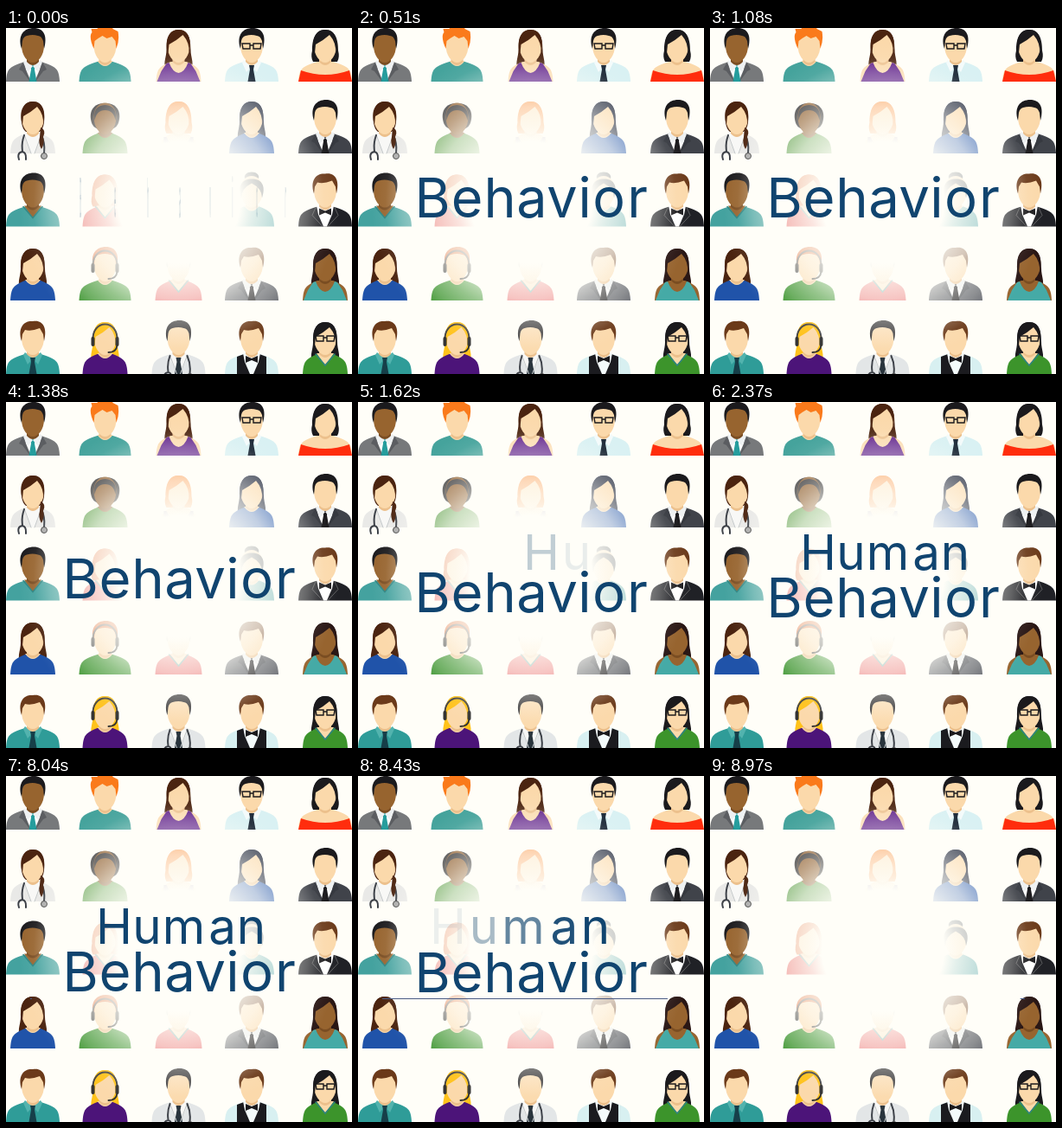
Write an HTML page that moves like this. It is 400 px wide and 400 px high and loops after 9000 ms.

```html
<!DOCTYPE html>
<html lang="en">
<head>
<meta charset="utf-8">
<title>Human Behavior</title>
<style>
html, body { margin: 0; width: 100%; height: 100%; overflow: hidden; background: #fffef8; }
svg { display: block; width: 100%; height: 100%; }
text { font-family: Inter, Roboto, sans-serif; font-weight: 400; fill: #10446f; text-anchor: middle; }
</style>
</head>
<body>
<svg viewBox="0 0 400 400">
  <defs>
    <radialGradient id="fade" gradientUnits="userSpaceOnUse" cx="200" cy="202" r="185">
      <stop offset=".38" stop-color="#fffef8"/>
      <stop offset=".46" stop-color="#fffef8" stop-opacity=".88"/>
      <stop offset=".60" stop-color="#fffef8" stop-opacity=".72"/>
      <stop offset=".70" stop-color="#fffef8" stop-opacity=".5"/>
      <stop offset=".81" stop-color="#fffef8" stop-opacity=".3"/>
      <stop offset=".91" stop-color="#fffef8" stop-opacity=".06"/>
      <stop offset="1" stop-color="#fffef8" stop-opacity="0"/>
    </radialGradient>
    <clipPath id="aboveLine"><rect width="400" height="257"/></clipPath>
  </defs>
  <g id="people"></g>
  <rect width="400" height="400" fill="url(#fade)"/>
  <g id="human"></g>
  <g clip-path="url(#aboveLine)"><g id="behavior"></g></g>
  <rect id="line" y="257" height="1" fill="#4a5b84"/>
</svg>
<script>
const $ = id => document.getElementById(id);
const shape = (d, fill) => `<path d="${d}" fill="${fill}"/>`;
const stroke = (d, color, width = 1.5) =>
  `<path d="${d}" fill="none" stroke="${color}" stroke-width="${width}" stroke-linecap="round"/>`;

const LIGHT = '#fbd9ab', BROWN = '#97642f';
const INK = '#1b1a1d', CHESTNUT = '#4b2410', UMBER = '#6b3a1a', ORANGE = '#fa7a1b', TEAL = '#45a39c';

// Figures are drawn around the middle of their lower edge.
const bust = w => `M${-w} 0C${1 - w} -15 ${3 - w} -17 -9 -23L9 -23C${w - 3} -17 ${w - 1} -15 ${w} 0Z`;
const tie = color => shape('M-3 -19H3L2 -14L4.500 0H-4.500L-2 -14Z', color);
const bow = shape('M-7 -21L0 -18L7 -21V-13L0 -16L-7 -13Z', INK);
const collar = color => shape('M-9 -25L0 -18L-6 -11L-11 -22ZM9 -25L0 -18L6 -11L11 -22Z', color);
const lapels = color => shape('M-11 -23L-16 -14L-12 -12L-3 0L-9 -16ZM11 -23L16 -14L12 -12L3 0L9 -16Z', color);
const opening = color => shape('M-10 -24L-8 -14L-2 0H2L8 -14L10 -24Z', color);
const stethoscope = stroke('M-10 -21C-14 -10 -12 -6 -12 -2M-12 -2C-18 -1 -17 4 -16 7M-12 -2C-7 -1 -8 4 -8 7M10 -21C15 -10 13 -4 13 0', '#3d4148', 2) +
  '<circle cx="13" cy="3" r="3.500" fill="#aaa" stroke="#444"/>';

const clothes = {
  tee: (c, w, skin) => shape(bust(w), c) + shape('M-9 -24Q0 -12 9 -24Z', skin),
  vneck: (c, w, skin) => shape(bust(w), c) + shape('M-10 -24L0 -10L10 -24Z', skin) + stroke('M-11 -23L0 -10L11 -23', '#2e8380'),
  dress: (c, w, skin) => shape(bust(w), skin) + shape(`M${1 - w} 0L${6 - w} -12L-14 -21L-11 -22Q-7 -11 0 -10Q7 -11 11 -22L14 -21L${w - 6} -12L${w - 1} 0Z`, c),
  tank: (c, w, skin) => shape(bust(w), skin) + shape('M-18 0L-17 -19H-14Q-10 -9 0 -9Q10 -9 14 -19H17L18 0Z', c),
  bare: (c, w, skin) => shape(bust(w), skin) + shape(`M${-w} 0L${3 - w} -13Q0 -3 ${w - 3} -13L${w} 0Z`, c),
  shirt: (c, w) => shape(bust(w), c) + collar('#f4fbfb') + tie('#1c2937'),
  plain: (c, w) => shape(bust(w), c) + collar('#52b3ae') + tie('#163f49'),
  suit: (c, w, skin, neck = INK) => shape(bust(w), c) + opening('#fff') + tie(neck) + collar('#eef1f2') + lapels('#25282e55'),
  tux: (c, w) => shape(bust(w), c) + opening('#fff') + bow + stroke('M-11 -22L-15 -13L-3 0M11 -22L15 -13L3 0', '#777', .7),
  vest: (c, w) => shape(bust(w), '#d8f0f1') + shape('M-17 0V-20L-9 -23L0 0L9 -23L17 -20V0Z', c) + opening('#f4fbfb') + bow,
  coat: (c, w, skin, neck) => shape(bust(w), c) + opening('#f8f8f6') + (neck ? tie(neck) : '') +
    stroke('M-10 -22L-2 0M10 -22L2 0', '#c4c8c9', 1) + stethoscope
};

const crop = 'M-13 -38C-18 -54 -10 -62 1 -62C13 -62 17 -53 13 -38L12 -47Q10 -53 6 -53Q0 -55 -7 -53Q-11 -52 -12 -47Z';
const sweep = 'M-13 -38C-18 -54 -10 -62 0 -61C12 -63 17 -53 13 -38L12 -46L8 -53Q-2 -49 -9 -51L-12 -46Z';
const fringe = 'M-12 -33C-17 -50 -10 -60 0 -60C11 -60 16 -49 12 -33Q13 -45 5 -54Q-3 -47 -11 -43Z';
const longBack = 'M0 -60C-12 -60 -14 -48 -14 -37C-14 -28 -18 -22 -15 -15Q-10 -14 -6 -18H6Q10 -14 15 -15C18 -22 14 -28 14 -37C14 -48 12 -60 0 -60Z';
const bobBack = 'M0 -60C-13 -60 -15 -46 -15 -36Q-17 -28 -14 -23H14Q17 -28 15 -36C15 -46 13 -60 0 -60Z';
const tiedBack = 'M0 -60C-12 -60 -14 -46 -13 -36Q-12 -28 -8 -25H8Q12 -28 13 -36C14 -46 12 -60 0 -60Z';

// Each style gives the part behind the head and the part in front of it.
const hairStyles = {
  crop: ['', crop],
  sweep: ['', sweep],
  spiky: ['', 'M-13 -38C-17 -47 -18 -54 -15 -57L-16 -61L-9 -61L-7 -65L0 -62L8 -64L9 -61L15 -58Q17 -48 13 -38L12 -47L8 -52L2 -50L-3 -53L-8 -50L-12 -47Z'],
  long: [longBack, fringe],
  bob: [bobBack, fringe],
  afro: ['M0 -58C-17 -58 -19 -44 -15 -34Q-12 -27 0 -27Q12 -27 15 -34C19 -44 17 -58 0 -58Z', 'M-12 -38Q-15 -55 0 -56Q15 -55 12 -38Q10 -50 0 -50Q-10 -50 -12 -38Z'],
  braid: [tiedBack, fringe + 'M9 -30Q16 -27 12 -19Q14 -12 10 -5Q6 -12 8 -19Z'],
  bun: ['M0 -63C-11 -63 -11 -51 0 -51C11 -51 11 -63 0 -63Z', 'M-12 -33C-17 -48 -10 -55 0 -55C11 -55 17 -48 12 -33Q12 -44 0 -50Q-12 -44 -12 -33Z']
};

const extras = {
  glasses: stroke('M-11 -44H-2V-38H-10ZM2 -44H11L10 -38H2ZM-2 -42H2', INK, 1.4),
  headset: stroke('M-14 -38C-16 -64 16 -64 14 -38', '#444', 2) +
    '<rect x="-16" y="-43" width="4" height="11" rx="2" fill="#333"/><rect x="12" y="-43" width="4" height="11" rx="2" fill="#333"/>' +
    stroke('M14 -33Q13 -25 4 -25', '#333', 2)
};

// hair style, hair colour, skin, clothes, clothes colour, half width, extra or tie colour
const crowd = [
  ['crop', INK, BROWN, 'suit', '#77797b', 31, '#259d9d'],
  ['spiky', ORANGE, LIGHT, 'tee', TEAL, 30],
  ['long', CHESTNUT, LIGHT, 'dress', '#5b1b88', 26],
  ['crop', INK, LIGHT, 'shirt', '#d9f1f3', 31, 'glasses'],
  ['bob', INK, LIGHT, 'bare', '#ff2d0d', 31],

  ['braid', CHESTNUT, LIGHT, 'coat', '#e9e9e7', 26],
  ['afro', INK, '#85511f', 'tee', '#4a9436', 26],
  ['bob', ORANGE, LIGHT, 'tank', '#5a4b91', 22],
  ['long', '#151d33', LIGHT, 'tee', '#2456ad', 26],
  ['crop', INK, LIGHT, 'suit', '#40434a', 31],

  ['crop', INK, BROWN, 'vneck', '#44a29f', 31],
  ['bob', '#e0602a', LIGHT, 'vneck', '#df3030', 26],
  null,
  ['bun', '#202936', LIGHT, 'tee', '#238e94', 26],
  ['sweep', UMBER, LIGHT, 'tux', '#202126', 31],

  ['long', CHESTNUT, LIGHT, 'tee', '#2053a9', 26],
  ['crop', '#d9581e', LIGHT, 'tee', '#2f8d22', 30, 'headset'],
  ['crop', INK, LIGHT, 'vneck', '#e2363d', 27],
  ['sweep', UMBER, LIGHT, 'suit', '#5c5f66', 31],
  ['long', '#2a1715', BROWN, 'dress', '#45aaa6', 26],

  ['sweep', UMBER, LIGHT, 'plain', '#2f9c98', 31],
  ['long', '#ffc21b', LIGHT, 'tee', '#4c1479', 26, 'headset'],
  ['crop', INK, LIGHT, 'coat', '#e3e6e7', 31, '#29343c'],
  ['sweep', UMBER, LIGHT, 'vest', '#1b1b1f', 31],
  ['long', INK, LIGHT, 'vneck', '#3c942b', 26, 'glasses']
];

const columns = [31, 114.5, 199.5, 284, 369], rows = [62, 145, 229.5, 315, 400];
$('people').innerHTML = crowd.map((person, i) => {
  if (!person) return '';
  const [style, hair, skin, wear, color, width, extra] = person;
  const [back, front] = hairStyles[style];
  const neck = skin === LIGHT ? '#ecc08c' : '#7a4d22';
  return `<g transform="translate(${columns[i % 5]} ${rows[Math.floor(i / 5)]})">` +
    shape(back, hair) + clothes[wear](color, width, skin, extra) +
    shape('M-7 -32H7V-23Q0 -15 -7 -23Z', neck) +
    shape('M-13 -42C-13 -64 13 -64 13 -42C13 -30 6 -22 0 -22C-6 -22 -13 -30 -13 -42Z', skin) +
    shape(front, hair) + (extras[extra] || '') + '</g>';
}).join('');

function makeWord(id, word, size, centers) {
  $(id).innerHTML = [...word].map(c => `<text font-size="${size}">${c}</text>`).join('');
  return [...$(id).children].map((el, i) => ({ el, x: centers[i] }));
}
const human = makeWord('human', 'Human', 56.5, [125, 163, 205.5, 250, 283.5]);
const behavior = makeWord('behavior', 'Behavior', 63.5, [86, 126, 164, 201, 236, 262, 290, 323]);

function place({ el, x }, dx, y, scaleX, alpha) {
  el.setAttribute('transform', `translate(${x + dx} ${y}) scale(${scaleX} 1)`);
  el.setAttribute('opacity', alpha);
}

const clamp = v => Math.min(1, Math.max(0, v));
const span = (t, start, length) => clamp((t - start) / length);
const cubicOut = p => 1 - (1 - p) ** 3;
const quadInOut = p => p < .5 ? 2 * p * p : 1 - 2 * (1 - p) ** 2;
const sineInOut = p => (1 - Math.cos(Math.PI * p)) / 2;

function draw(t) {
  const flip = cubicOut(span(t, 0, 930));
  const scaleX = Math.max(.03, Math.sin(flip * Math.PI / 2));
  const drop = 30 * quadInOut(span(t, 1080, 800)) + 60 * span(t, 8370, 420) ** 2;
  const shown = t < 8800 ? clamp(.4 + t / 300) : 0;
  behavior.forEach(letter => place(letter, 0, 219 + drop, scaleX, shown));

  human.forEach((letter, i) => {
    const delay = i * 34;
    const enter = quadInOut(span(t, 1500 + delay, 734));
    const gone = Math.max(0, t - 8040 - delay);
    const dx = 92 * (1 - enter) - 21 * (gone / 390) ** 2;
    place(letter, dx, 194, 1, span(t, 1570 + delay, 200) * clamp((400 - gone) / 120));
  });

  const left = 28 + 336 * sineInOut(span(t, 8640, 360));
  const right = 28 + 336 * cubicOut(span(t, 8040, 530));
  $('line').setAttribute('x', left);
  $('line').setAttribute('width', Math.max(0, right - left));
}

const start = performance.now();
function tick() {
  draw((performance.now() - start) % 9000);
  requestAnimationFrame(tick);
}
tick();
</script>
</body>
</html>
```
